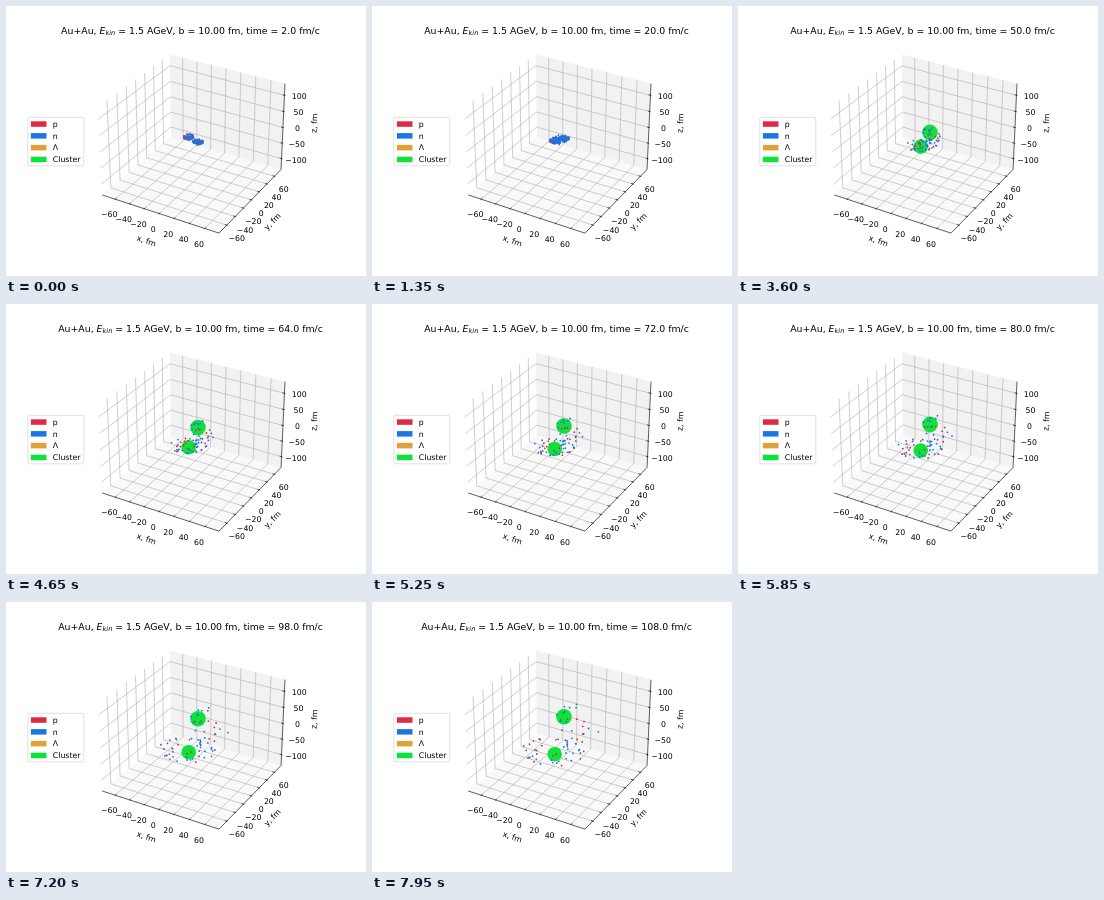
An HTML page for the animation above (8 s loop, 360 by 270 pixels).

```html
<!DOCTYPE html>
<html>
<head>
<meta charset="utf-8">
<style>
html, body { margin: 0; width: 100%; height: 100%; overflow: hidden; background: #fff; }
svg { display: block; width: 360px; height: 270px; font: 7.81px "DejaVu Sans", sans-serif; }
.mid { text-anchor: middle; }
.title { font-size: 9.375px; text-anchor: middle; white-space: pre; }
.grid { fill: none; stroke: #b0b0b0; stroke-width: .625; }
.axis { fill: none; stroke: #000; stroke-width: .625; }
.dots { fill: none; stroke-width: 1.8; stroke-linecap: round; }
</style>
</head>
<body>
<svg viewBox="0 0 360 270">
  <text class="title" x="184.5" y="27.7">Au+Au, <tspan font-style="italic">E</tspan><tspan font-style="italic" font-size="6.56" dy="1.5">kin</tspan><tspan dy="-1.5"> = 1.5 AGeV, b = 10.00 fm, time = </tspan><tspan id="time">2.0</tspan> fm/c</text>
  <g id="box"></g>
  <g id="clusters" fill="#0de338"><circle r="7.3"/><circle r="7.8"/></g>
  <path id="p" class="dots" stroke="#df2a43"/>
  <path id="n" class="dots" stroke="#1a74e0"/>
  <g id="legend"><rect x="21.8" y="111.3" width="56" height="48.5" rx="1.6" fill="#fff" stroke="#ccc" stroke-width=".6"/></g>
</svg>
<script>
const $ = id => document.getElementById(id);
const add = (id, markup) => $(id).insertAdjacentHTML('beforeend', markup);

// Perspective view of a box with half extents 1 (elevation 30, azimuth -60)
function project([x, y, z]) {
  x *= .5952; y *= .5952; z *= .4464;
  const k = 1123.8 / (10 - .433 * x + .75 * y - .5 * z);
  return [187.3 + k * (.866 * x + .5 * y), 133.5 - k * (-.25 * x + .433 * y + .866 * z)];
}
const line = pts => 'M' + pts.map(p => project(p).map(v => v.toFixed(2))).join('L');
const path = (pts, attrs) => add('box', `<path d="${line(pts)}" ${attrs}/>`);

// The axis coordinate v runs along edges whose other coordinates scale with s
const axes = [
  { name: 'x', max: 78.1, step: 20, count: 3, turn: 18, pane: '#f5f5f5',
    at: (v, s) => [v, -s, -1], label: (v, s) => [v, -s, -s], grid: v => [[v, -1, -1], [v, 1, -1], [v, 1, 1]] },
  { name: 'y', max: 78.1, step: 20, count: 3, turn: -46, pane: '#f9f9f9',
    at: (v, s) => [s, v, -1], label: (v, s) => [s, v, -s], grid: v => [[1, v, -1], [-1, v, -1], [-1, v, 1]] },
  { name: 'z', max: 135.4, step: 50, count: 2, turn: -87.3, pane: '#f2f2f2',
    at: (v, s) => [s, 1, v], label: (v, s) => [s, s, v], grid: v => [[-1, -1, v], [-1, 1, v], [1, 1, v]] }
];
const ticks = a => Array.from({ length: 2 * a.count + 1 }, (_, i) => (i - a.count) * a.step);

for (const { at, pane } of axes)
  path([at(-1, 1), at(1, 1), at(1, -1), at(-1, -1)], `fill="${pane}"`);
for (const a of axes)
  for (const value of ticks(a)) path(a.grid(value / a.max), 'class="grid"');
for (const a of axes) {
  path([a.at(-1, 1), a.at(1, 1)], 'class="axis"');
  for (const value of ticks(a)) {
    const v = value / a.max, [x, y] = project(a.label(v, 1.166));
    path([a.at(v, 1.016), a.at(v, .968)], 'class="axis"');
    add('box', `<text class="mid" x="${x}" y="${y + 5.9}">${String(value).replace('-', '−')}</text>`);
  }
  const [x, y] = project(a.label(0, 1.361));
  add('box', `<text class="mid" transform="translate(${x} ${y}) rotate(${a.turn})" y="2.4">${a.name}, fm</text>`);
}

[['p', '#df2a43'], ['n', '#1a76e0'], ['Λ', '#e0a136'], ['Cluster', '#0de338']].forEach(([name, color], i) => {
  const y = 115.3 + i * 11.8;
  add('legend', `<rect x="24.9" y="${y}" width="15.6" height="5.5" fill="${color}"/><text x="46.8" y="${y + 5.5}">${name}</text>`);
});

let seed = 7;
const rand = () => (seed = seed * 16807 % 2147483647) / 2147483647;
function inEllipse(cx, cy, rx, ry) {
  const r = Math.sqrt(rand()), a = rand() * 2 * Math.PI;
  return [cx + rx * r * Math.cos(a), cy + ry * r * Math.sin(a)];
}
const many = (count, make) => Array.from({ length: count }, (_, i) => make(i));

// Bound nucleons fill two passing discs; free ones fly from the overlap to a wide cloud
const bound = count => many(count, i => ({ side: i % 2, at: inEllipse(0, 0, 5.4, 3) }));
const free = count => many(count, i => ({
  from: inEllipse(187, 133.5, 8, 4),
  to: i % 5 < 3 ? inEllipse(180, 150, 32, 15) : inEllipse(204, 124, 23, 25)
}));
const nucleons = {
  p: { bound: bound(80), free: free(22) },
  n: { bound: bound(90), free: free(45) }
};

const meet = 14, bind = 24, last = 108;
const centre = (side, t) => side ? [192, 136 - .2 * (t - 2)] : [182.7, 131 + .2 * (t - 2)];

function draw(t) {
  $('time').textContent = t.toFixed(1);
  const clustered = t >= bind, k = (t - meet) / (last - meet);
  for (const kind in nucleons) {
    const { bound, free } = nucleons[kind], dots = [];
    if (!clustered) for (const { side, at } of bound)
      dots.push(centre(side, t).map((v, i) => v + at[i]));
    if (t >= meet) for (const { from, to } of free)
      dots.push(from.map((v, i) => v + (to[i] - v) * k));
    $(kind).setAttribute('d', dots.map(([x, y]) => `M${x.toFixed(2)} ${y.toFixed(2)}h.01`).join(''));
  }
  $('clusters').setAttribute('visibility', clustered ? 'visible' : 'hidden');
  [...$('clusters').children].forEach((c, side) => {
    const [x, y] = centre(side, t);
    c.setAttribute('cx', x);
    c.setAttribute('cy', y);
  });
}

let shown;
function frame(now) {
  const t = 2 + 2 * Math.floor(now % 8000 / 150);
  if (t !== shown) draw(shown = t);
  requestAnimationFrame(frame);
}
frame(0);
</script>
</body>
</html>
```
